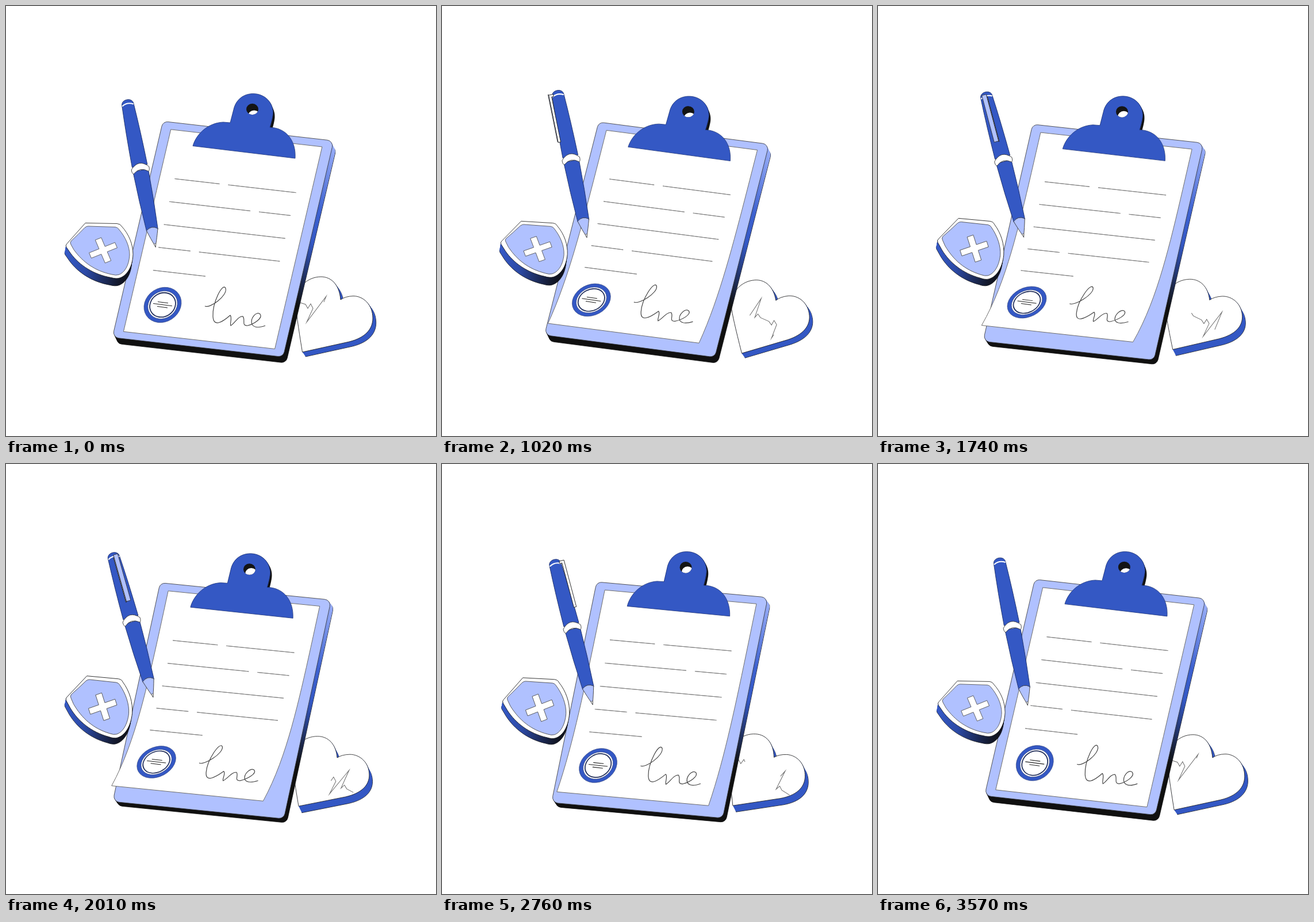
Recreate the animation shown at these times as an HTML page with a canvas. Size 748 px wide and 748 px high, loop 3.6 s.

```html
<!DOCTYPE html>
<html lang="en">
<head>
<meta charset="utf-8">
<title>Medical form</title>
<style>
  html, body { margin: 0; width: 100%; height: 100%; overflow: hidden; background: #fff; }
  canvas { display: block; }
</style>
</head>
<body>
<canvas id="stage" width="748" height="748"></canvas>
<script>
const ctx = document.getElementById('stage').getContext('2d');
const LOOP = 3600, TAU = Math.PI * 2;
const BLUE = '#3458c4', LIGHT = '#b0c1ff', INK = '#141414', GREY = '#6d6d6d', WHITE = '#fff';

// Everything floats on one slow wave; a swing is [amplitude, phase in degrees].
let wave = 0;
const swing = ([amount, phase], w = wave) => amount * Math.cos(w - phase * TAU / 360);

const motions = {
  board: { center: [378, 405], x: [2.7, -59], y: [-3.7, 41], turn: [.022, 81], stretch: [-.0136, 81] },
  shield: { center: [165, 424], x: [1.8, -66], y: [1.7, -17], turn: [-.036, 0], stretch: [-.058, 56] },
  heart: { center: [567, 539], x: [4.7, 59], y: [1.9, 67], turn: [-.07, 98], stretch: [.038, 0] }
};

function floating({ center: [cx, cy], x, y, turn, stretch }, w) {
  return new DOMMatrix()
    .translate(cx + swing(x, w), cy + swing(y, w))
    .scale(1, 1 + swing(stretch, w))
    .rotate(swing(turn, w) * 360 / TAU)
    .translate(-cx, -cy);
}
const pose = motion => floating(motion, wave).multiply(floating(motion, 0).inverse());

// Unit square to the tilted face of the board.
const plane = new DOMMatrix([297, 34, -88, 376, 273, 200.5]);
const onPlane = (u, v) => {
  const p = plane.transformPoint({ x: u, y: v });
  return [p.x, p.y];
};

const knobEdge = 'M390 203L396 180C400 162 414 152.5 430 152.5C450 152.5 465 168 464.5 186C464.5 192 461 205 459 211';
const beat = 'l4 7l5-8l4 8l-11 24l34-45l-14 34l6-6l4 7l14 8';
const shapes = {
  knob: new Path2D(knobEdge + 'Z'),
  clip: new Path2D(knobEdge + 'C488 212 505 235 503 265L325 243.5C331 222 352 203 378 202L390 203Z'),
  shield: new Path2D('M138 377.5L193 378.5Q199 379 201 383C214 397 221 415 221 432C220 455 210 469 198 473Q192 475 183 472.5C152 467 128 451 113 431L105 419.5Q103 416 106 413.5Z'),
  shieldInner: new Path2D('M143 383L190 384.5Q194 385 196 388C208 402 215 418 215 433C214 452 206 464 196 467.5Q191 469 184 467C155 461 134 446 118 424L113 415Q111 412 113 409Q125 398 137 385.5Q140 383 143 383Z'),
  heart: new Path2D('M515.5 602L597 584C625 577 638 562 638 543C638 520 622 504.5 604 504.5Q590 505 582 511C580 485 566 471 548 471C524 471 504 490 504 517Q504 532 515.5 602Z'),
  pulse: new Path2D('M460 500L521 519' + beat + beat),
  signature: new Path2D('M346 522C354 527 386 504 382 491C377 480 359 516 360 540C361 558 374 552 390 538C394 542 389 552 391 556C398 552 404 539 412 540C417 546 409 556 420 556C432 553 447 543 442 536C436 530 424 543 428 554C433 561 443 559 451 556'),
  sealText: new Path2D('M264 514.5l18 2.3M256 517.5l33 4.3M263 522.5l18 2.5'),
  penTop: new Path2D('M-10.3 9C-9.5 -2 9.5 -2 10.3 9Q13 60 13.5 118L-13.5 118Q-13 60 -10.3 9Z'),
  penLow: new Path2D('M-13.5 126L13.5 126Q13 180 10 232L-10 232Q-13 180 -13.5 126Z'),
  nib: new Path2D('M-10 231Q0 223 10 231Q5 248 1.5 257L0 262L-1.5 257Q-5 248 -10 231Z'),
  nibTip: new Path2D('M-1.7 256L1.7 256L0 262Z'),
  band: new Path2D('M-15.5 122Q0 105 15.5 122Q16 129 13 130Q0 119 -13 130Q-16 129 -15.5 122Z'),
  stripe: new Path2D('M-10 10.5Q0 4.5 10 10.5'),
  board: new Path2D(),
  cross: new Path2D(),
  hole: new Path2D()
};

shapes.hole.ellipse(428.5, 179.5, 10.5, 9.7, 0, 0, TAU);

shapes.board.moveTo(...onPlane(.5, 0));
for (const [u, v, nextU, nextV] of [[1, 0, 1, 1], [1, 1, 0, 1], [0, 1, 0, 0], [0, 0, 1, 0]]) {
  shapes.board.arcTo(...onPlane(u, v), ...onPlane(nextU, nextV), 10);
}
shapes.board.closePath();

for (let i = 0; i < 4; i++) {
  for (let [u, v] of [[1, -.23], [1, .23], [.23, .23]]) {
    for (let n = 0; n < i; n++) [u, v] = [-v, u];
    shapes.cross.lineTo(169 + 22.5 * u + 8.5 * v, 425 - 9 * u + 20 * v);
  }
}
shapes.cross.closePath();

function gradient(x0, y0, x1, y1, stops) {
  const g = ctx.createLinearGradient(x0, y0, x1, y1);
  for (const [at, color] of stops) g.addColorStop(at, color);
  return g;
}
const boardSide = gradient(0, 240, 0, 515, [[0, '#98adf7'], [.4, '#3d61cf'], [.6, BLUE], [1, '#101010']]);
const shieldSide = gradient(104, 430, 198, 484, [[0, BLUE], [.4, '#2c4aa6'], [1, '#10131f']]);

function paint(path, fill, stroke, width = .8) {
  if (fill) { ctx.fillStyle = fill; ctx.fill(path); }
  if (stroke) { ctx.strokeStyle = stroke; ctx.lineWidth = width; ctx.stroke(path); }
}

function polygon(points) {
  const path = new Path2D();
  points.forEach(p => path.lineTo(...p));
  path.closePath();
  return path;
}

// Sweeps a shape along (dx, dy) and leaves the front pose set.
function extrude(path, m, dx, dy, fill) {
  const steps = 16;
  for (let i = steps; i > 0; i--) {
    ctx.setTransform(m.a, m.b, m.c, m.d, m.e + dx * i / steps, m.f + dy * i / steps);
    paint(path, fill, i === steps && INK);
  }
  ctx.setTransform(m);
}

function drawHeart() {
  extrude(shapes.heart, pose(motions.heart), 5.7, 9.5 - swing([2.3, 50]), BLUE);
  paint(shapes.heart, WHITE, INK);
  ctx.setLineDash([167, 253]);
  ctx.lineDashOffset = -(17 + 420 * wave / TAU);
  paint(shapes.pulse, null, GREY, 1);
  ctx.setLineDash([]);
}

function drawShield() {
  extrude(shapes.shield, pose(motions.shield), -2.2, 12 + swing([2.1, 65]), shieldSide);
  paint(shapes.shield, WHITE, INK);
  paint(shapes.shieldInner, LIGHT, '#444');
  paint(shapes.cross, WHITE, '#444');
}

function drawPaper(m) {
  const left = .056, right = .942, top = .033, bottom = .968;
  const lift = (1 - Math.cos(wave)) / 2;

  // The sheet curls up towards its lower edge.
  const curl = (x, y) => {
    const p = m.transformPoint({ x, y });
    const v = Math.max(0, (plane.inverse().transformPoint({ x, y }).y - top) / (bottom - top));
    return [p.x - 22 * lift * v ** 4.2, p.y - 17.5 * lift * v ** 3];
  };
  const frameAt = (x, y) => {
    const [o, p, q] = [curl(x, y), curl(x + 1, y), curl(x, y + 1)];
    return new DOMMatrix([p[0] - o[0], p[1] - o[1], q[0] - o[0], q[1] - o[1], ...o]).translate(-x, -y);
  };

  const rightEdge = [], leftEdge = [];
  for (let i = 0; i <= 20; i++) {
    const v = top + (bottom - top) * i / 20;
    rightEdge.push(curl(...onPlane(right, v)));
    leftEdge.unshift(curl(...onPlane(left, v)));
  }
  ctx.resetTransform();
  paint(polygon([...rightEdge, ...leftEdge]), WHITE, GREY, 1);

  const rowWidth = 211, gap = 15;
  [78, 141, rowWidth, 55.5, 91].forEach((stop, row) => {
    const rule = (from, to) => {
      const at = d => curl(293.5 - 9.4 * row + d, 300.5 + 39.8 * row + d * .1145);
      paint(polygon([at(from), at(to)]), null, '#848484', 1);
    };
    rule(0, stop);
    if (row < 4 && stop + gap < rowWidth) rule(stop + gap, rowWidth);
  });

  ctx.setTransform(frameAt(272.5, 520));
  const ring = (size, fill, stroke, width) => {
    const path = new Path2D();
    path.ellipse(272.5, 520, 33.8 * size, 29.3 * size, -.58, 0, TAU);
    paint(path, fill, stroke, width);
  };
  ring(1, BLUE, '#2a3a70', .6);
  ring(.79, WHITE, '#2a3a70', .6);
  ring(.69, WHITE, '#26325c', 1.8);
  paint(shapes.sealText, null, '#222', 1.1);

  ctx.setTransform(frameAt(398, 525));
  paint(shapes.signature, null, '#444', 1.2);
}

function drawClip(m, dx, dy) {
  extrude(shapes.knob, m, dx * .5, dy * .65, INK);
  paint(shapes.clip, BLUE, '#20367a');
  paint(shapes.hole, INK);
  ctx.save();
  ctx.clip(shapes.hole);
  ctx.translate(dx * .6, dy * 1.1);
  paint(shapes.hole, WHITE);
  ctx.restore();
}

function drawBoard() {
  const m = pose(motions.board), dx = 5.2, dy = 9.1 + swing([2.3, 50]);
  extrude(shapes.board, m, dx, dy, boardSide);
  paint(shapes.board, LIGHT, '#333');
  drawPaper(m);
  drawClip(m, dx, dy);
}

// The pocket clip orbits the barrel once per loop.
function drawPocketClip(s, c) {
  const edge = -4 * c * Math.sign(s), inner = 12 * s + edge, outer = 16.5 * s + edge;
  paint(polygon([[8 * s, 6], [outer, 6], [outer, 90], [inner, 90], [inner, 10], [8 * s, 10]]), WHITE, INK);
  if (c > 0) {
    const face = new Path2D();
    face.rect(16.5 * s - 4 * c, 5, 8 * c, 84);
    paint(face, LIGHT, '#333');
  }
}

function drawPen() {
  const turn = wave - Math.PI - .1, s = Math.sin(turn), c = Math.cos(turn);
  ctx.setTransform(1, 0, 0, 1, 227.5 + swing([7.6, 0]), 283.6 + swing([10.6, -47]));
  ctx.rotate(swing([.051, 46]) - .228);
  ctx.translate(0, -131);
  if (c < -.2) drawPocketClip(s, c);
  paint(shapes.penTop, BLUE, '#182a63');
  paint(shapes.stripe, null, WHITE, 2);
  if (c >= -.2) drawPocketClip(s, c);
  paint(shapes.penLow, BLUE, '#182a63');
  paint(shapes.nib, LIGHT, '#333');
  paint(shapes.nibTip, WHITE, '#333', .6);
  paint(shapes.band, WHITE, '#333');
}

function frame() {
  wave = performance.now() % LOOP / LOOP * TAU;
  ctx.resetTransform();
  ctx.fillStyle = WHITE;
  ctx.fillRect(0, 0, 748, 748);
  drawHeart();
  drawBoard();
  drawShield();
  drawPen();
  requestAnimationFrame(frame);
}
frame();
</script>
</body>
</html>
```
